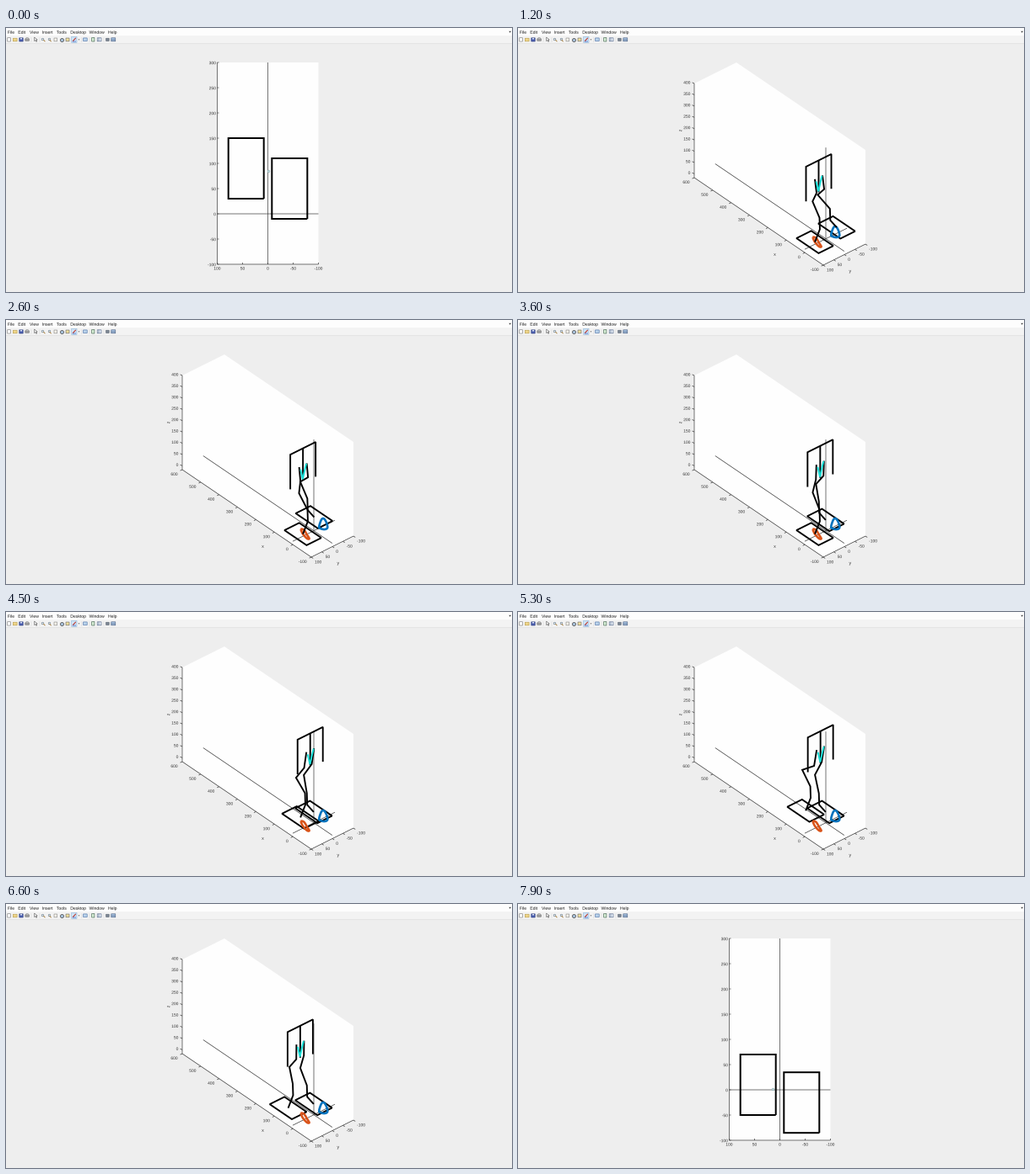
Write a matplotlib script that moves like this. It is 600 px wide and 314 px high and loops after 8000 ms.

```python
import math

import numpy as np
import matplotlib.pyplot as plt
from matplotlib.animation import FuncAnimation
from matplotlib.patches import PathPatch, Polygon, Rectangle
from matplotlib.textpath import TextPath
from matplotlib.transforms import Affine2D

W, H, DPI = 600, 314, 100
FRAMES, STEP = 80, 100
PX = 72 / DPI
INK = "#3c3c3c"
BODY_ON, BODY_OFF = 100, 7100      # span of the 3D view, ms

plt.rcParams["path.snap"] = False
fig = plt.figure(figsize=(W / DPI, H / DPI), dpi=DPI, facecolor="#eeeeee")
ax = fig.add_axes([0, 0, 1, 1])
ax.set_xlim(0, W)
ax.set_ylim(H, 0)
ax.axis("off")

flat, solid = [], []               # artists of the top view and of the 3D view


def line(pts, color=INK, width=0.7, group=None, z=3):
    xs, ys = zip(*pts) if len(pts) else ((), ())
    art, = ax.plot(xs, ys, color=color, lw=width * PX, zorder=z,
                   solid_capstyle="butt", solid_joinstyle="miter")
    if group is not None:
        group.append(art)
    return art


def text(x, y, s, size=4.9, ha="center", group=None, color="#333333", turn=0):
    """Unhinted text, so that tiny letters keep their shapes."""
    path = TextPath((0, 0), s, size=size, prop={"family": "Liberation Sans"})
    ink = path.get_extents()
    shift = {"left": ink.x0, "center": (ink.x0 + ink.x1) / 2, "right": ink.x1}[ha]
    place = (Affine2D().translate(-shift, -0.36 * size).scale(1, -1)
             .rotate_deg(-turn).translate(x, y))
    art = ax.add_patch(PathPatch(place.transform_path(path), fc=color, ec="none", zorder=4))
    if group is not None:
        group.append(art)


def area(pts, color, group=None, z=1, edge="none"):
    art = Polygon(pts, closed=True, fc=color, ec=edge, lw=0.5 * PX, zorder=z)
    ax.add_patch(art)
    if group is not None:
        group.append(art)


def box(x, y, w, h, fill, edge="none", z=2):
    ax.add_patch(Rectangle((x, y), w, h, fc=fill, ec=edge, lw=0.6 * PX, zorder=z))


# ---------- window chrome ----------
def draw_window():
    box(0, 0, W, 9.5, "#fdfdfd")
    box(0, 9.5, W, 8.5, "#f3f3f3")
    line([(0, 18.3), (W, 18.3)], "#e0e0e0", 0.7)
    menu = [(2.3, "File"), (14.7, "Edit"), (28, "View"), (43.2, "Insert"), (60, "Tools"),
            (76.7, "Desktop"), (98.6, "Window"), (121.4, "Help")]
    for x, word in menu:
        text(x, 4.9, word, 5.1, "left", color="#151515")
    area([(596.3, 3.8), (599, 3.8), (597.6, 5.6)], "#303030", z=4)

    box(1.7, 11.6, 3.6, 4.4, "#ffffff", "#777777")
    box(8.3, 12.2, 4.8, 3.6, "#f0d68a", "#b59a48")
    box(15.8, 11.8, 4.4, 4.2, "#4b5fb0", "#35437c")
    box(17, 11.9, 2, 1.5, "#dfe5f5")
    box(22.8, 12.8, 4.6, 2.4, "#a2a2a2", "#707070")
    box(24, 11.5, 2.2, 1.4, "#ffffff", "#888888")
    area([(33.6, 11), (33.6, 15.6), (35, 14.5), (36, 16.4), (36.6, 15.8),
          (35.8, 14.2), (37.2, 14)], "#ffffff", z=3, edge="#444444")
    for x in (43.4, 50.6):
        ax.plot([x], [13], "o", ms=2.6 * PX, mfc="#e6f0f8", mec="#6a7a8a",
                mew=0.6 * PX, zorder=3)
        line([(x + 1, 14), (x + 3, 16.2)], "#a8803c", 0.9)
    box(57, 12, 3.6, 3.8, "#f7f3ea", "#888888")
    ax.plot([66], [13.8], "o", ms=4 * PX, mfc="#a9c4de", mec="#555555",
            mew=0.8 * PX, zorder=3)
    box(71, 12, 4, 3.8, "#f0df9a", "#666666")
    box(77.6, 10.3, 6.4, 7, "#cfe4f7", "#90b8dc")
    line([(79, 15.8), (82.8, 11.8)], "#c0392b", 1.1, z=4)
    line([(79, 16), (83, 16)], "#3b5fc0", 0.7, z=4)
    area([(85.6, 13.4), (87.4, 13.4), (86.5, 14.6)], "#444444", z=3)
    box(91.6, 11.9, 4.6, 3.6, "#b9d2ea", "#4a6fa5")
    box(101.7, 11.4, 3.2, 4.6, "#d4ecd4", "#40604a")
    box(108.2, 11.8, 4.8, 4, "#e4ecf6", "#56698a")
    line([(110, 11.8), (110, 15.8)], "#56698a", 0.6)
    box(118.6, 12.2, 3.6, 3.2, "#7d8794", "#5a6470")
    box(124.8, 11.8, 5, 4, "#a9c4e4", "#44597c")
    line([(125, 14), (129.6, 14)], "#44597c", 0.6)
    for x in (30, 40, 89.5, 99, 116):
        line([(x, 11), (x, 17)], "#d4d4d4", 0.5)


# ---------- top view ----------
def plan(x, y):
    """Screen place of forward distance x and sideways distance y."""
    return 310.5 - 0.6 * y, 221 - 0.6 * x


def plan_rect(x, y):
    return [plan(x + a, y + b) for a, b in
            ((-60, -35), (60, -35), (60, 35), (-60, 35), (-60, -35))]


def draw_plan():
    area([plan(-100, 100), plan(300, 100), plan(300, -100), plan(-100, -100)],
         "#fefefe", flat)
    line([plan(300, 100), plan(-100, 100), plan(-100, -100)], group=flat)
    line([plan(300, 0), plan(-100, 0)], group=flat)
    line([plan(0, 100), plan(0, -100)], group=flat)
    for v in range(-100, 301, 50):
        px, py = plan(v, 100)
        line([(px, py), (px + 2, py)], group=flat)
        text(px - 1.8, py + 0.4, str(v), ha="right", group=flat)
    for v in range(-100, 101, 50):
        px, py = plan(-100, v)
        line([(px, py), (px, py - 2)], group=flat)
        text(px, py + 4.8, str(v), group=flat)


# ---------- 3D view ----------
def proj(x, y, z=0):
    return (365 - 0.2186 * x - 0.25 * y,
            250.7 - 0.1486 * x + 0.125 * y - 0.268 * z)


def draw_space():
    area([(209, 66), (259, 41), (412, 145), (412, 257), (362, 282), (209, 178)],
         "#fefefe", solid)
    line([(209, 66), (209, 178), (362, 282), (412, 257)], group=solid)
    line([proj(600, 0), proj(-100, 0)], group=solid)
    line([proj(0, 100), proj(0, -100)], group=solid)
    line([proj(0, 0, 405), proj(0, 0)], group=solid)
    for v in range(0, 401, 50):
        y = 173.4 - 0.2685 * v
        line([(209, y), (206.6, y - 1.2)], group=solid)
        text(204.2, y - 1.3, str(v), ha="right", group=solid)
    for v in range(-100, 601, 100):
        x, y = 340.14 - 0.2186 * v, 267.14 - 0.1486 * v
        line([(x, y), (x - 2.4, y + 1.2)], group=solid)
        text(x - 5.6, y + 5.2, str(v), ha="right", group=solid)
    for v in range(-100, 101, 50):
        x, y = 387 - 0.25 * v, 269.5 + 0.125 * v
        line([(x, y), (x + 2.2, y + 1.5)], group=solid)
        text(x + 4.4, y + 5.6, str(v), ha="left", group=solid)
    text(304.5, 269, "x", 5.2, group=solid)
    text(393.8, 288.8, "y", 5.2, group=solid)
    text(192.3, 122, "z", 5.2, group=solid, turn=90)


def loop(pts, color):
    """Closed smooth curve through a few points."""
    p = np.array(pts, float)
    out = []
    for i in range(len(p)):
        a, b, c, d = (p[(i + k) % len(p)] for k in (-1, 0, 1, 2))
        for s in np.linspace(0, 1, 8, endpoint=False):
            out.append(b + 0.5 * s * (c - a + s * (2 * a - 5 * b + 4 * c - d
                                                   + s * (3 * (b - c) + d - a))))
    out.append(out[0])
    line(out, color, 2.6, solid, z=5)


# ---------- motion ----------
def swing(t, start, length):
    """Forward share and lift of a foot during one step."""
    s = min(max((t - start) / length, 0), 1)
    return s * s * (3 - 2 * s), 42 * math.sin(math.pi * s)


KEYS = np.array([0, 390, 1200, 1800, 2600, 3600, 4500, 5300, 5900, 6600, 7100])
MASS_X = np.array([-6, 0, 12.2, 24, 39.5, 38.5, 55, 69, 74, 76, 84])
MASS_Y = np.array([2, 13, 23.3, 24, 17, -7, -31, -35, -25, -2, 0])


def glide(t, values):
    """Cubic Hermite interpolation over the key times."""
    slope = np.gradient(values.astype(float), KEYS)
    i = min(max(np.searchsorted(KEYS, t, "right") - 1, 0), len(KEYS) - 2)
    h = KEYS[i + 1] - KEYS[i]
    s = (t - KEYS[i]) / h
    return ((1 + 2 * s) * (1 - s) ** 2 * values[i] + s * (1 - s) ** 2 * h * slope[i]
            + s * s * (3 - 2 * s) * values[i + 1] + s * s * (s - 1) * h * slope[i + 1])


def knee(x0, z0, x1, z1, bone=67):
    """Joint bent forward between two equal bones."""
    dx, dz = x1 - x0, z1 - z0
    d = math.hypot(dx, dz)
    off = math.sqrt(max(bone ** 2 - d * d / 4, 0))
    return (x0 + x1) / 2 - dz / d * off, (z0 + z1) / 2 + dx / d * off


def leg(mx, my, side, fx, fz):
    hip_y, foot_y = my + 18 * side, 43 * side
    low_y = 0.65 * my + 18 * side
    ankle_y = 16 * side
    kx, kz = knee(mx, 212, fx + 6, fz + 92)
    return [proj(mx, hip_y, 277), proj(mx, low_y, 212),
            proj(kx, (low_y + ankle_y) / 2, kz),
            proj(fx + 6, ankle_y, fz + 92), proj(fx + 4, ankle_y, fz + 42),
            proj(fx, foot_y, fz)]


def sole(x, y, z):
    return [proj(x + a, y + b, z) for a, b in
            ((-60, -35), (60, -35), (60, 35), (-60, 35), (-60, -35))]


draw_window()
draw_plan()
draw_space()
loop([(371.2, 246), (374, 237.5), (377, 236.3), (380, 241), (381.2, 247),
      (378, 249), (373.4, 248.2)], "#0072bd")
loop([(349.8, 249), (353.4, 249.8), (357, 255.5), (359.6, 260),
      (356.8, 259.8), (352, 254.5)], "#d95319")

plan_feet = [line([], "black", 2, flat, z=5) for _ in range(2)]
dot, = ax.plot([], [], "o", ms=2.7 * PX, mfc="#cfe3e6", mec="#86aab0",
               mew=0.6 * PX, zorder=6)
flat.append(dot)
soles = [line([], "black", 1.9, solid, z=4) for _ in range(2)]
legs = [line([], "black", 1.9, solid, z=6) for _ in range(2)]
frame_bar, pole = (line([], "black", 1.9, solid, z=6) for _ in range(2))
trail = line([], "#17dfd8", 2, solid, z=7)


def put(art, pts):
    art.set_data(*np.array(pts, float).T)


def show_plan(t):
    if t < BODY_ON:
        left, right, spot = 90, 50, (310.5, 170.3)
    else:
        left = 10
        right = -30 + 80 * swing(t, 7650, 1700)[0]
        when = [7100, 7200, 7300, 7600, 7700, 7900]
        spot = (np.interp(t, when, [306, 304.8, 304.8, 302.3, 302.3, 302]),
                np.interp(t, when, [223, 221.9, 221.9, 220.3, 220.3, 220]))
    put(plan_feet[0], plan_rect(left, 43))
    put(plan_feet[1], plan_rect(right, -43))
    put(dot, [spot])


def show_body(t):
    mx, my = glide(t, MASS_X), glide(t, MASS_Y)
    for i, (side, home, start) in enumerate(((1, 10, 3855), (-1, -30, 390))):
        share, lift = swing(t, start, 2480)
        x = home + 80 * share
        put(soles[i], sole(x, 43 * side, lift))
        put(legs[i], leg(mx, my, side, x, lift))
    put(frame_bar, [proj(mx, my + 60 * s, z) for s, z in
                    ((1, 198), (1, 352), (-1, 352), (-1, 198))])
    cx, cy = proj(mx, my, 352)
    put(pole, [(cx, cy), (cx, cy + 38)])
    put(trail, [(cx - 3, cy + 25), (cx - 0.3, cy + 36.8), (cx + 1.6, cy + 28),
                (cx + 4, cy + 18.2)])


def update(n):
    t = n * STEP
    body = BODY_ON <= t < BODY_OFF
    for art in flat:
        art.set_visible(not body)
    for art in solid:
        art.set_visible(body)
    (show_body if body else show_plan)(t)
    return flat + solid


anim = FuncAnimation(fig, update, frames=FRAMES, interval=STEP, repeat=True,
                     repeat_delay=0, blit=False)
plt.show()
```
